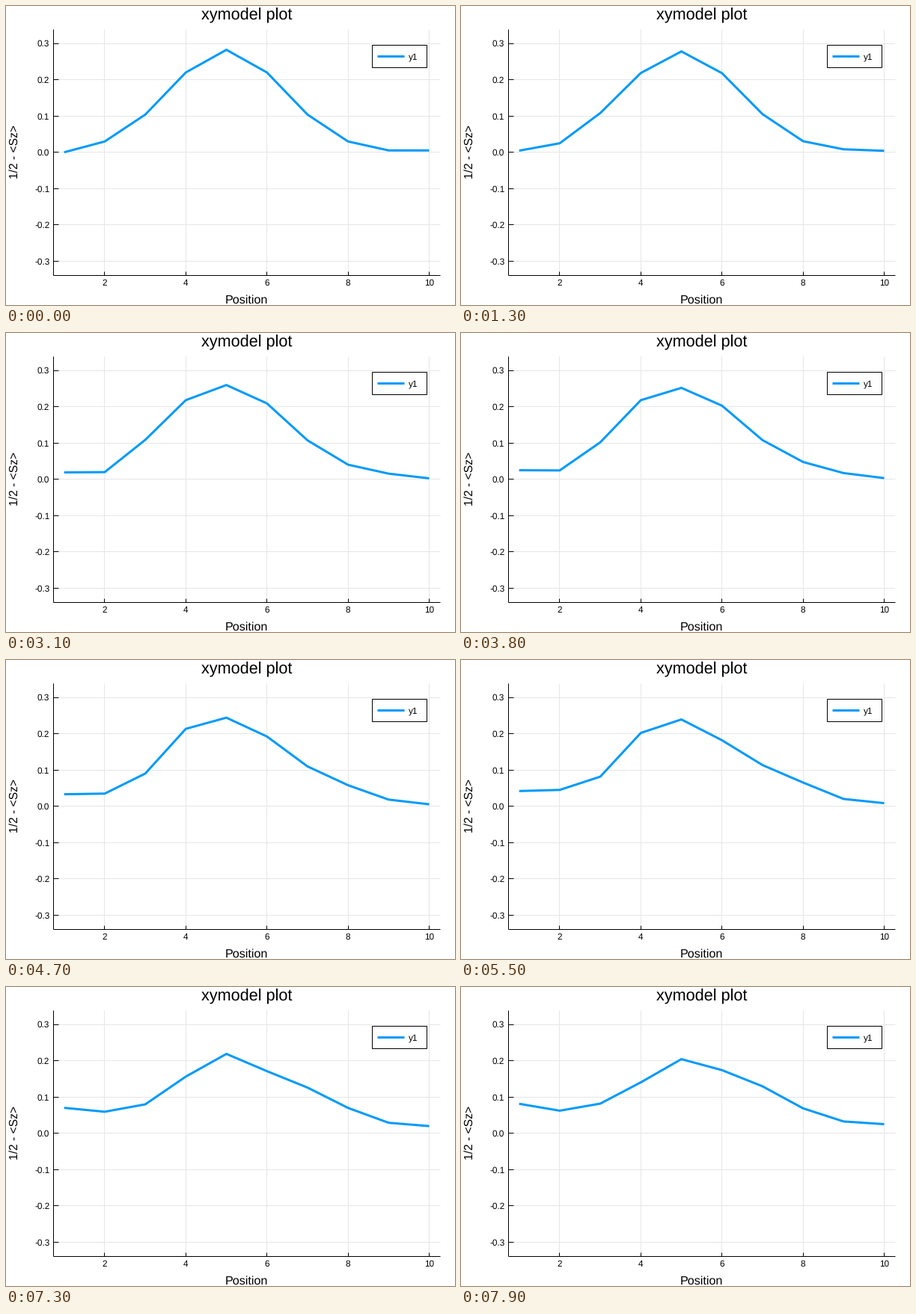
A matplotlib script for the animation above (8000 ms loop, 600 by 400 pixels).

```python
import numpy as np
import matplotlib.pyplot as plt
from matplotlib.animation import FuncAnimation
from matplotlib.patches import Rectangle

W, H, DPI = 600, 400, 100
FRAMES, STEP = 80, 100
SITES = 10
RATE = 0.31  # hopping strength per second
BLUE, GRID = "#009AFA", "#e6e6e6"
PT = 72 / DPI
LEFT, RIGHT, TOP, BOTTOM = 63, 580, 31, 360

plt.rcParams["font.family"] = "Liberation Sans"
plt.rcParams["axes.unicode_minus"] = False
plt.rcParams["text.hinting"] = "none"

# One flipped spin hopping along an open chain with reflecting ends
chain = np.eye(SITES, k=1) + np.eye(SITES, k=-1)
chain[0, 0] = chain[-1, -1] = 1
energy, modes = np.linalg.eigh(chain)

# Gaussian packet around site 5: empty first site, flat last step
site = np.arange(1, SITES + 1)
packet = np.exp(-(site - 5) ** 2 / 8)
packet[0], packet[-1] = 0, packet[-2]
packet /= np.linalg.norm(packet)
weights = modes.T @ packet


def density(t):
    wave = modes @ (np.exp(-1j * RATE * t * energy) * weights)
    return np.abs(wave) ** 2


def px(pos):
    return 77.7 + 54.2 * (pos - 1)


def py(value):
    return 195.7 - 485.5 * value


fig = plt.figure(figsize=(W / DPI, H / DPI), dpi=DPI, facecolor="white")
ax = fig.add_axes([0, 0, 1, 1])
ax.set_xlim(0, W)
ax.set_ylim(H, 0)
ax.axis("off")


def stroke(xs, ys, color="black", width=1, z=2):
    return ax.plot(xs, ys, color=color, lw=width * PT, zorder=z,
                   solid_capstyle="butt", solid_joinstyle="miter")[0]


def label(x, y, text, size=11.8, ha="center", **kw):
    ax.text(x, y, text, fontsize=size * PT, ha=ha, va="baseline", **kw)


for pos in range(2, SITES + 1, 2):
    x = np.floor(px(pos))
    stroke([x, x], [TOP, BOTTOM], GRID, z=1)
    stroke([x, x], [BOTTOM, BOTTOM - 5])
    label(px(pos), 374, str(pos))

for k in range(-3, 4):
    y = np.floor(py(k / 10))
    stroke([LEFT, RIGHT], [y, y], GRID, z=1)
    stroke([LEFT, LEFT + 7], [y, y])
    label(58.3, py(k / 10) + 4.3, f"{k / 10:.1f}", ha="right")

stroke([LEFT, LEFT], [TOP, BOTTOM])
stroke([LEFT, RIGHT], [BOTTOM, BOTTOM])

label(322, 18.5, "xymodel plot", 21.7)
label(321.7, 398, "Position", 16.1)
label(16, 195.3, "1/2 - <Sz>", 15.6, rotation=90, rotation_mode="anchor")

curve = stroke(px(site), py(density(0)), BLUE, 3, z=3)

ax.add_patch(Rectangle((489, 52), 73, 30, fc="white", ec="black",
                       lw=PT, zorder=4))
stroke([496, 532], [67, 67], BLUE, 3, z=5)
label(538, 72, "y1", ha="left", zorder=5)


def update(frame):
    curve.set_ydata(py(density(frame * STEP / 1000)))
    return [curve]


anim = FuncAnimation(fig, update, frames=FRAMES, interval=STEP,
                     repeat=True, repeat_delay=0, blit=False)
plt.show()
```
